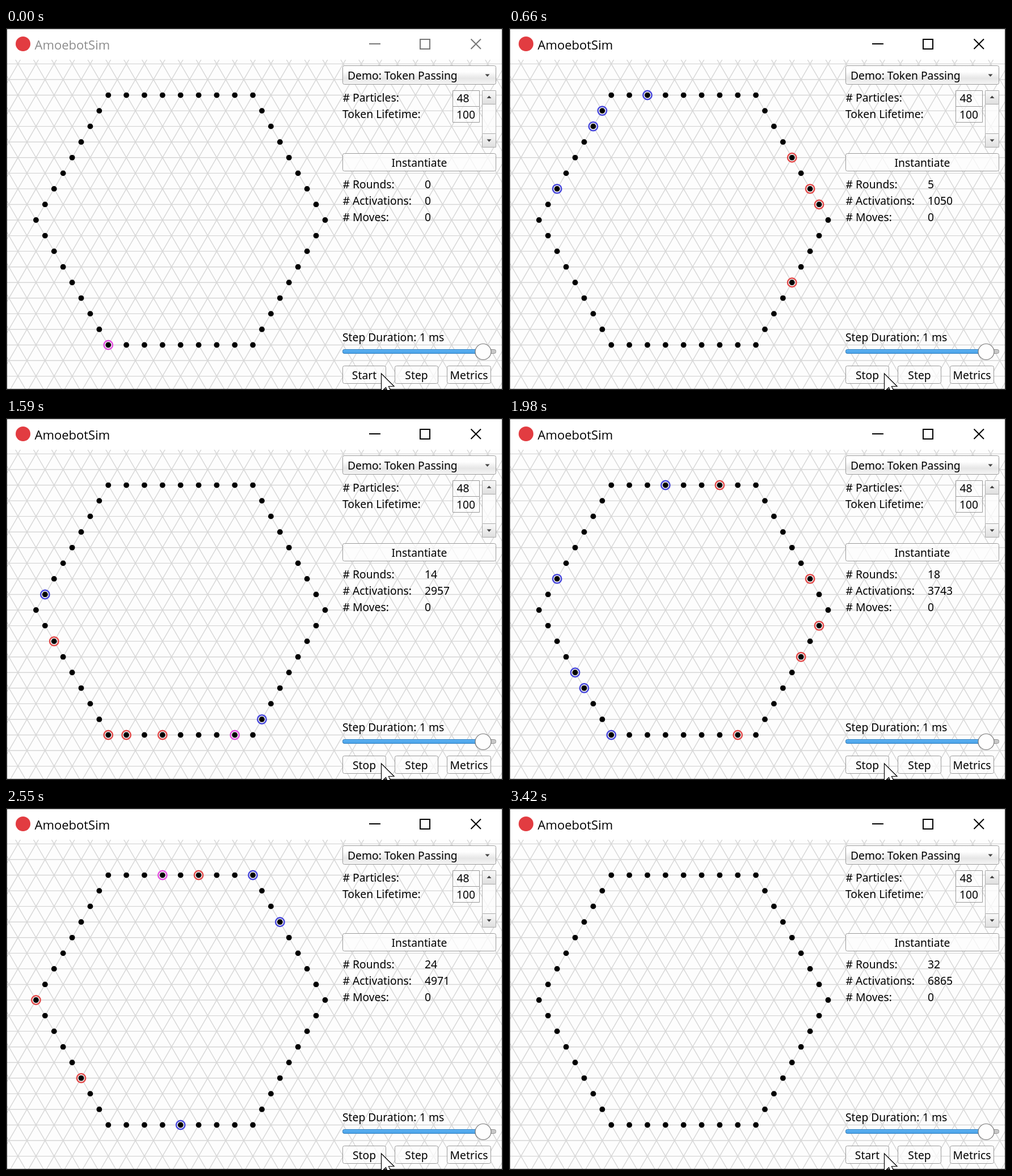
Recreate the animation shown at these times as an HTML page with a canvas. Size 876 px wide and 639 px high, loop 3750 ms.

```html
<!DOCTYPE html>
<html lang="en">
<head>
<meta charset="utf-8">
<title>AmoebotSim</title>
<style>
  html, body { margin: 0; width: 100%; height: 100%; overflow: hidden; background: #fdfdfd; }
  canvas { display: block; }
</style>
</head>
<body>
<canvas id="stage" width="876" height="639"></canvas>
<script>
const ctx = document.getElementById('stage').getContext('2d');
const LOOP = 3750, STEP = 30, START = 120, END = 3420;
const SIDE = 31.85, ROW = 27.56, X0 = 180.3, Y0 = 559.5;
const COUNT = 48, LIFETIME = 100;

// Hops made by each token at these times; each leaves the seed a little later than the one before.
const TIMES = [660, 1050, 1590, 1980, 2550, END];
const RED = [
  [20, 34, 55, 74, 93, 132], [18, 31, 51, 66, 88, 126], [18, 30, 49, 63, 88, 125],
  [17, 29, 48, 61, 77, 115], [12, 26, 42, 55, 75, 113]
];
const BLUE = [
  [18, 29, 57, 67, 92, 131], [15, 28, 41, 58, 75, 115], [14, 24, 41, 52, 75, 113],
  [14, 24, 39, 51, 72, 109], [10, 23, 39, 48, 67, 101.5]
];
const ACTIVATIONS = [1050, 1854, 2957, 3743, 4971, 6865];
const ROUNDS = [5, 8, 14, 18, 24, 32];

// Piecewise linear value that rises from zero at time begin
function valueAt(t, begin, values) {
  if (t <= begin) return 0;
  let i = TIMES.findIndex(time => t <= time);
  if (i < 0) return values[values.length - 1];
  const t0 = i ? TIMES[i - 1] : begin, v0 = i ? values[i - 1] : 0;
  return v0 + (values[i] - v0) * (t - t0) / (TIMES[i] - t0);
}

// Particles run clockwise around the hexagon from its bottom left corner
const particles = [];
(function () {
  let x = X0, y = Y0;
  const sides = [[-.5, -1], [.5, -1], [1, 0], [.5, 1], [-.5, 1], [-1, 0]];
  for (const [dx, dy] of sides)
    for (let i = 0; i < 8; i++) {
      particles.push([x, y]);
      x += dx * SIDE;
      y += dy * ROW;
    }
})();

function text(str, x, y, { size = 19.3, color = '#000', align = 'left', font = '"Noto Sans"' } = {}) {
  ctx.font = `${size}px ${font}, sans-serif`;
  ctx.fillStyle = color;
  ctx.textAlign = align;
  ctx.fillText(str, x, y);
}

function line(points, color, width) {
  ctx.beginPath();
  points.forEach(([x, y]) => ctx.lineTo(x, y));
  ctx.strokeStyle = color;
  ctx.lineWidth = width;
  ctx.stroke();
}

function disc(x, y, r, fill, stroke, width = 1) {
  ctx.beginPath();
  ctx.arc(x, y, r, 0, 7);
  if (fill) { ctx.fillStyle = fill; ctx.fill(); }
  if (stroke) { ctx.strokeStyle = stroke; ctx.lineWidth = width; ctx.stroke(); }
}

function box(x, y, w, h, fill, stroke = '#9a9a9a', radius = 3) {
  ctx.beginPath();
  ctx.roundRect(x + .5, y + .5, w - 1, h - 1, radius);
  ctx.fillStyle = fill;
  ctx.fill();
  ctx.strokeStyle = stroke;
  ctx.lineWidth = 1;
  ctx.stroke();
}

function shade(y, h, ...colors) {
  const g = ctx.createLinearGradient(0, y, 0, y + h);
  colors.forEach((c, i) => g.addColorStop(i / (colors.length - 1), c));
  return g;
}

function button(label, x, y, w, h) {
  box(x, y, w, h, 'rgba(254,254,254,.72)');
  text(label, x + w / 2, y + 23.5, { align: 'center' });
}

function arrow(x, y, dir) {
  ctx.beginPath();
  ctx.moveTo(x - 4, y - 2 * dir);
  ctx.lineTo(x + 4, y - 2 * dir);
  ctx.lineTo(x, y + 2.5 * dir);
  ctx.fillStyle = '#444';
  ctx.fill();
}

function drawGrid() {
  ctx.save();
  ctx.beginPath();
  ctx.rect(2, 56, 872, 581);
  ctx.clip();
  const color = '#d6d6d6', top = Y0 - 20 * ROW, bottom = Y0 + 4 * ROW;
  for (let y = top; y < bottom; y += ROW) line([[0, y], [876, y]], color, 1.4);
  for (let i = -22; i < 40; i++) {
    const x = X0 + i * SIDE;
    line([[x - 2 * SIDE, bottom], [x + 10 * SIDE, top]], color, 1.4);
    line([[x + 2 * SIDE, bottom], [x - 10 * SIDE, top]], color, 1.4);
  }
  ctx.restore();
}

function drawTitleBar(active) {
  const color = active ? '#000' : '#8c8c8c', glyph = active ? '#000' : '#777';
  ctx.fillStyle = '#fff';
  ctx.fillRect(0, 0, 876, 56);
  disc(30, 28, 13, '#e23c41');
  text('AmoebotSim', 50.5, 38, { size: 22, color, font: '"Open Sans"' });
  line([[640, 28], [660, 28]], glyph, 2);
  ctx.strokeRect(730, 20, 17, 17);
  line([[819.5, 19.5], [837, 37]], glyph, 2);
  line([[837, 19.5], [819.5, 37]], glyph, 2);
}

function drawPanel(t, running) {
  box(593, 66, 271, 34, shade(66, 34, '#fff', '#fefefe', '#e6e6e6', '#f6f6f6'));
  text('Demo: Token Passing', 602, 91);
  arrow(848.5, 83.5, 1);

  text('# Particles:', 593.5, 130);
  text('Token Lifetime:', 593, 159);
  box(787, 110, 48, 29, 'rgba(254,254,254,.65)', '#999', 0);
  box(787, 138, 48, 29, 'rgba(254,254,254,.65)', '#999', 0);
  text('48', 794.5, 130.5);
  text('100', 794, 159.5);

  box(839, 110, 25, 101, 'rgba(254,254,254,.75)', '#b4b4b4', 0);
  box(839, 110, 25, 25, shade(110, 25, '#fafafa', '#dedede'), '#a8a8a8', 1);
  box(839, 186, 25, 25, shade(186, 25, '#fafafa', '#dedede'), '#a8a8a8', 1);
  arrow(851.5, 122, -1);
  arrow(851.5, 198.5, 1);

  button('Instantiate', 593, 221, 271, 32);
  const stats = {
    Rounds: Math.floor(valueAt(t, START, ROUNDS) + .001),
    Activations: Math.round(valueAt(t, START - STEP, ACTIVATIONS)),
    Moves: 0
  };
  Object.entries(stats).forEach(([name, value], i) => {
    text(`# ${name}:`, 593.5, 283 + 29 * i);
    text(value, 738, 283 + 29 * i);
  });

  text('Step Duration:', 593, 553);
  text('1 ms', 729, 553);
  box(593, 567, 271, 8, '#c9c9c9', '#929292');
  box(593, 567, 250, 8, shade(567, 8, '#62b5f4', '#459fe6'), '#3481c0');
  disc(841, 571.5, 14, '#fefefe', '#777', 1.2);

  button(running ? 'Stop' : 'Start', 593, 596, 77, 32);
  button('Step', 685, 596, 77, 32);
  button('Metrics', 777, 596, 78, 32);
}

function drawParticles(t) {
  const rings = new Map();
  const place = (tokens, dir, bit) => tokens.forEach((hops, k) => {
    const n = Math.floor(valueAt(t, START + 23 * k, hops));
    if (n > LIFETIME || t >= END) return;
    const at = (dir * n + 3 * COUNT) % COUNT;
    rings.set(at, rings.get(at) | bit);
  });
  place(RED, -1, 1);
  place(BLUE, 1, 2);

  const colors = [, '#e34b4b', '#4848dc', '#e44fe0'];
  particles.forEach(([x, y], i) => {
    if (rings.has(i)) disc(x, y, 7.7, null, colors[rings.get(i)], 2.5);
    disc(x, y, 4.9, '#000');
  });
}

function drawCursor() {
  ctx.beginPath();
  [[661.5, 610], [684, 632.5], [674.5, 632.5], [680, 645], [675, 647], [669.5, 634.5], [661.5, 642]]
    .forEach(([x, y]) => ctx.lineTo(x, y));
  ctx.closePath();
  ctx.fillStyle = '#fff';
  ctx.fill();
  ctx.strokeStyle = '#000';
  ctx.lineWidth = 1.2;
  ctx.stroke();
}

function draw(now) {
  const t = Math.floor(now % LOOP / STEP) * STEP;
  ctx.fillStyle = '#fdfdfd';
  ctx.fillRect(0, 0, 876, 639);
  drawGrid();
  drawTitleBar(t >= START);
  drawParticles(t);
  drawPanel(t, t >= START && t < END);
  ctx.strokeStyle = '#2b2b2b';
  ctx.lineWidth = 2;
  ctx.strokeRect(1, 1, 874, 637);
  drawCursor();
}

let began;
function tick(now) {
  began ??= now;
  draw(now - began);
  requestAnimationFrame(tick);
}
requestAnimationFrame(tick);
</script>
</body>
</html>
```
